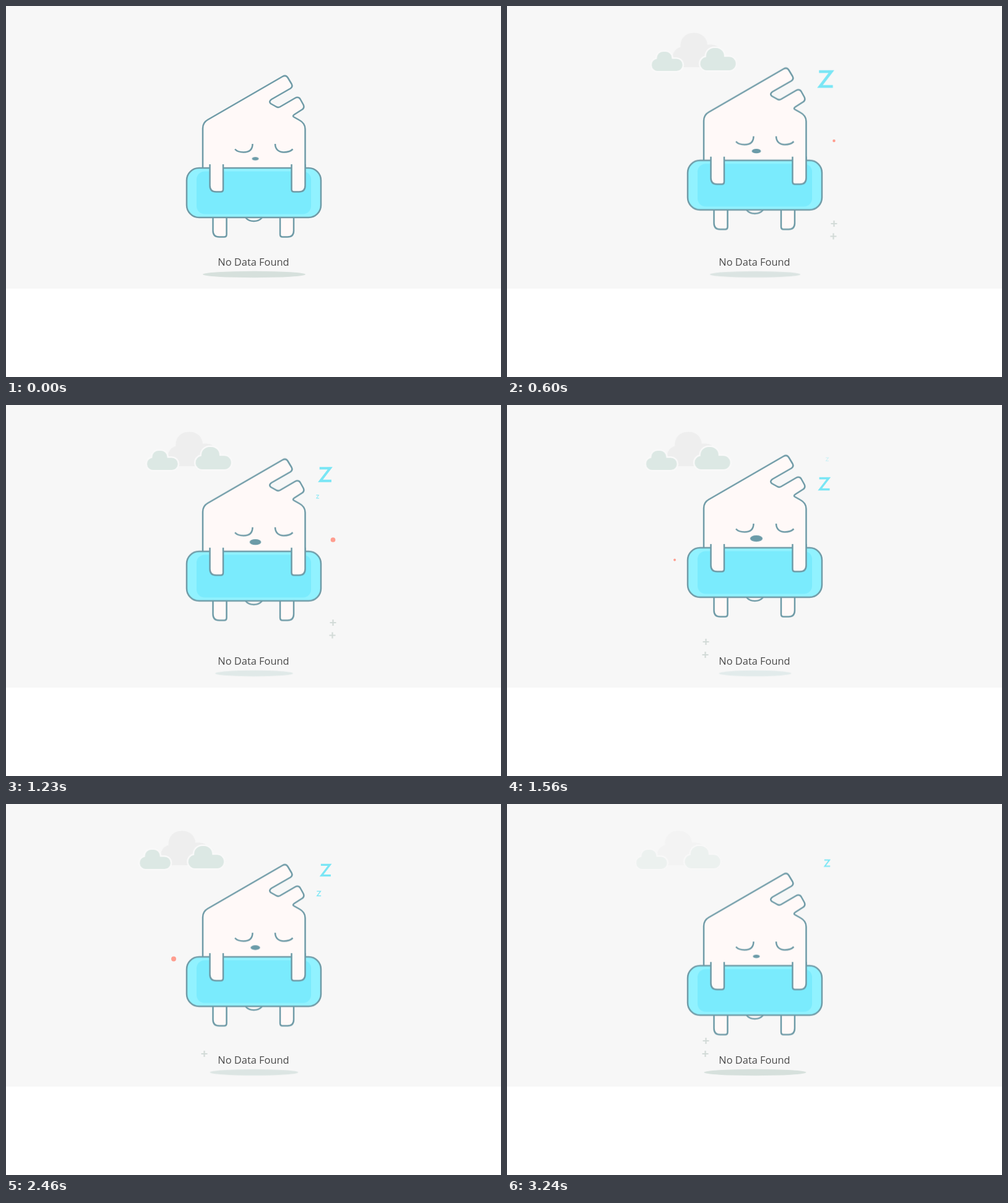
Animation, 800 px wide and 600 px high, one loop 3.27 s. Source, as an HTML page:

```html
<!DOCTYPE html>
<html lang="en">
<head>
<meta charset="utf-8">
<title>No data</title>
<style>
  html, body { margin: 0; width: 100%; height: 100%; overflow: hidden; background: #fff; }
  svg { display: block; width: 800px; height: 600px; }

  .bob, .nose, .shadow, .clouds { animation: 3270ms linear infinite; }
  .bob { animation-name: bob; }
  .nose { animation-name: nose; transform-origin: 403px 247px; }
  .shadow { animation-name: shadow; transform-origin: 401px 434px; }
  .clouds { animation-name: drift, fade; }

  @keyframes bob { 47% { transform: translateY(-31.6px); } }
  @keyframes nose {
    0%, 100% { transform: scale(.55); }
    47% { transform: scale(1.02); }
  }
  @keyframes shadow {
    0%, 100% { transform: none; fill: #d6e0dc; }
    47% { transform: scale(.7, .92); fill: #e2ebeb; }
  }
  @keyframes drift {
    from { transform: translateX(8.5px); }
    to { transform: translateX(-22.5px); }
  }
  @keyframes fade {
    0% { opacity: 0; }
    15.3%, 90% { opacity: 1; }
    100% { opacity: .34; }
  }

  .skin { fill: #fff9f8; }
  .line { stroke: #6f9ba7; stroke-width: 2.5; stroke-linejoin: round; stroke-linecap: butt; }
  .puff { fill: #dce8e4; stroke: #f9f9f9; stroke-width: 5; paint-order: stroke; }
  .snore { fill: none; stroke: #7ae6f5; stroke-width: 2.3; }
  .plus { fill: none; stroke: #d3dbd8; stroke-width: 2.2; }
  .dot { fill: #ff9d8f; }
  text { font: 16.4px "Open Sans", "Noto Sans", sans-serif; fill: #4a4a4a; text-anchor: middle; }
</style>
</head>
<body>
<svg viewBox="0 0 800 600">
  <rect width="800" height="457" fill="#f7f7f7"/>

  <g class="clouds">
    <path fill="#eee" d="M281 99A16.5 16.5 0 0 1 277.5 66.5V64A20 20 0 0 1 297.5 43.5H301A20 20 0 0 1 321 62.5H328A18 18 0 0 1 343 72V99Z"/>
    <path class="puff" d="M241 105A9.8 9.8 0 0 1 239.5 85.5V84A10 10 0 0 1 249.5 74H253.5A10 10 0 0 1 263.5 84V85.5H271A9.75 9.75 0 0 1 271 105Z"/>
    <path class="puff" d="M321 104A10.8 10.8 0 0 1 319 82.5V81A13 13 0 0 1 332 68H335A13 13 0 0 1 348 81V82.3H356A10.8 10.8 0 0 1 356 104Z"/>
  </g>

  <ellipse class="shadow" cx="401" cy="434" rx="83" ry="5.2"/>
  <text x="400" y="420">No Data Found</text>
  <g id="sparks"></g>

  <g class="bob">
    <!-- legs and tail -->
    <g class="skin line">
      <path d="M334.5 340V363.500Q334.500 373.500 344.500 373.500H352.500Q356.500 373.500 356.500 369.500V340"/>
      <path d="M465 340V363.500Q465 373.500 455 373.500H447Q443 373.500 443 369.500V340"/>
      <path d="M387 342Q392 348 400.500 348T414 342"/>
    </g>
    <!-- body -->
    <path class="skin line" d="M318 264V198Q318 188.500 326 184L447 114Q452.500 111 455.500 116L461.500 126Q464 130.500 459.500 133.500L429 151Q424 154.500 428 158L436 162.500Q439.500 165 443 163L467 149Q472.500 146 475.500 150.500L480.500 159.500Q483 164.500 478.500 167.500L466 175.500Q462 178 466 180L474 184.500Q483.500 189.500 483.500 199V264"/>
    <!-- face -->
    <g class="line" fill="none">
      <path d="M370 231.500C373.500 235.500 379 236.500 384 236.500C393 236.500 398.500 232 398.500 223"/>
      <path d="M435 223C435 232 441 236.500 449 236.500C455 236.500 460 235 463.500 231.500"/>
    </g>
    <ellipse class="nose" cx="403" cy="247" rx="10" ry="5" fill="#6b9ba8"/>
    <!-- cushion -->
    <rect class="line" x="292" y="262" width="217" height="80" rx="20" fill="#91f2ff"/>
    <rect x="308" y="267.5" width="185" height="69" rx="13" fill="#7aebfd"/>
    <!-- arms -->
    <g class="skin line">
      <path d="M329.500 256V290.500Q329.500 300.500 339.500 300.500H347Q351 300.500 351 296.500V256"/>
      <path d="M483.500 256V290.500Q483.500 300.500 473.500 300.500H465.500Q461.500 300.500 461.500 296.500V256"/>
    </g>
  </g>

  <g id="snores"></g>
</svg>
<script>
  const LOOP = 3270, SPARK_CYCLE = 820, SPARK_START = 190;

  // start and life in ms
  const snores = [[-10, 1222], [636, 1038], [1100, 1222], [1675, 1222], [2274, 1222]];

  // from, to, x, y, first radius, last radius
  const dots = [
    [0, 80, 271, 250.5, 3, 1.3],
    [100, 320, 271, 250.5, 4.2, 2.3],
    [320, 465, 528.5, 364, 5.8, 5],
    [465, 820, 528.5, 218, 4.5, 1.5]
  ];

  // from, to, x, y
  const pluses = [
    [0, 320, 320.5, 404], [0, 110, 321.5, 383],
    [320, 465, 271, 238.5], [320, 465, 270, 259],
    [465, 820, 528.5, 352], [465, 820, 527.5, 372.5]
  ];

  function make(parent, tag, attrs) {
    const el = document.createElementNS("http://www.w3.org/2000/svg", tag);
    for (const key in attrs) el.setAttribute(key, attrs[key]);
    return document.getElementById(parent).appendChild(el);
  }

  const snoreEls = snores.map(() =>
    make("snores", "path", { class: "snore", d: "M-5.4 -6H4.6L-4.6 6H5.800" }));
  const dotEls = dots.map(([, , cx, cy]) => make("sparks", "circle", { class: "dot", cx, cy }));
  const plusEls = pluses.map(([, , x, y]) =>
    make("sparks", "path", { class: "plus", d: `M${x - 5} ${y}h10M${x} ${y - 5}v10` }));

  const show = (el, on) => el.setAttribute("visibility", on ? "visible" : "hidden");

  // A snore rises along a curve, swelling to its middle and shrinking again.
  function drawSnore(el, [start, life], t) {
    const u = (t - start) / life;
    const on = t >= 30 && u > 0 && u < 1;
    show(el, on);
    if (!on) return;
    const x = 498 + 19.5 * (1 - (1 - u) ** 3);
    const y = 156.5 - 77 * u;
    const size = 2 * (1 - Math.abs(2 * u - 1));
    el.setAttribute("transform", `translate(${x} ${y}) scale(${size})`);
    el.setAttribute("opacity", Math.min(1, Math.max(0, (0.93 - u) / 0.12)));
  }

  function draw(t) {
    snoreEls.forEach((el, i) => drawSnore(el, snores[i], t));
    const p = (t + 130) % SPARK_CYCLE;
    const live = ([from, to]) => t >= SPARK_START && p >= from && p < to;
    dotEls.forEach((el, i) => {
      const [from, to, , , r0, r1] = dots[i];
      show(el, live(dots[i]));
      el.setAttribute("r", Math.max(0, r0 + (r1 - r0) * (p - from) / (to - from)));
    });
    plusEls.forEach((el, i) => show(el, live(pluses[i])));
  }

  let begin;
  function tick(now) {
    begin ??= now;
    draw((now - begin) % LOOP);
    requestAnimationFrame(tick);
  }
  draw(0);
  requestAnimationFrame(tick);
</script>
</body>
</html>
```
